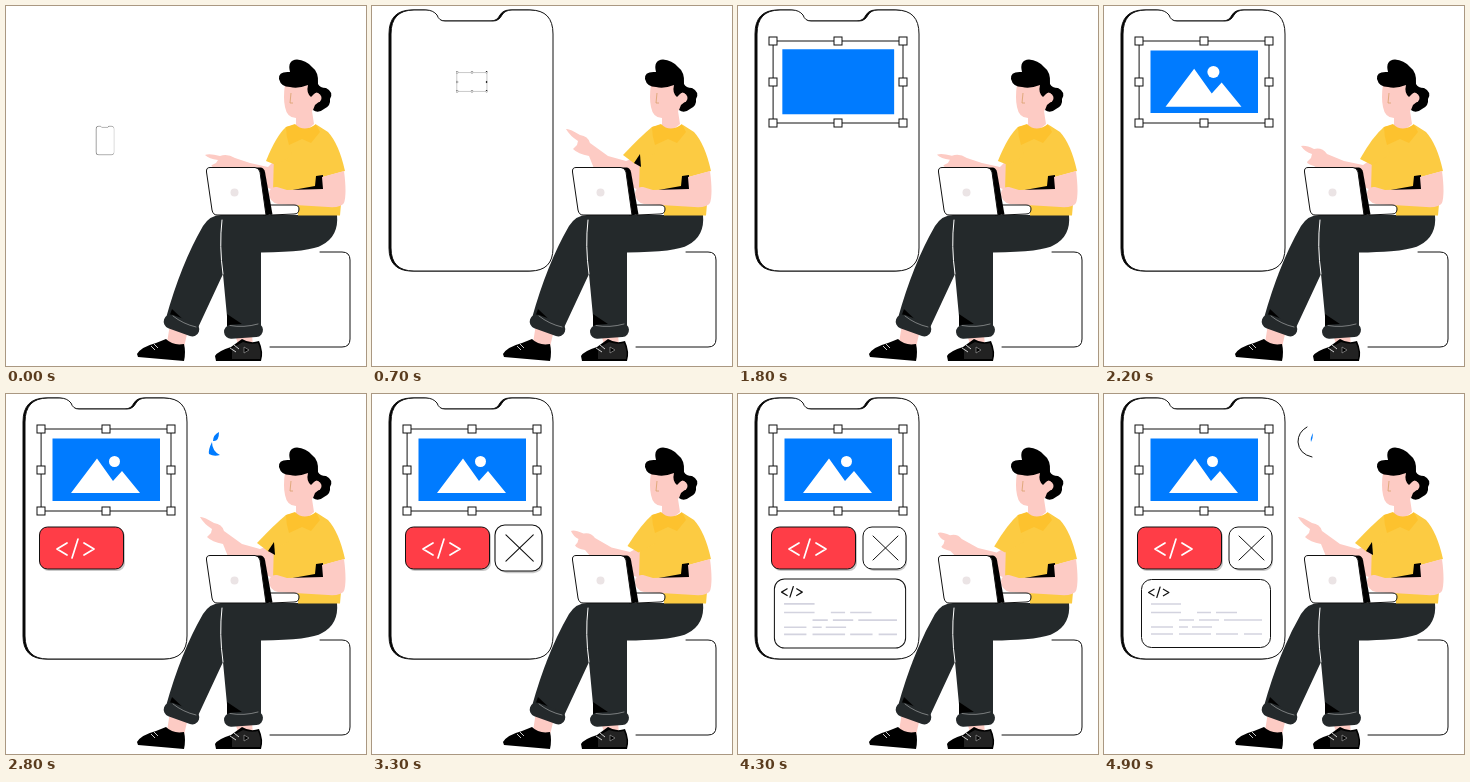
An HTML page for the animation above (5 s loop, 360 by 360 pixels).

```html
<!DOCTYPE html>
<html lang="en">
<head>
<meta charset="utf-8">
<title>App builder</title>
<style>
@property --s { syntax: "<number>"; inherits: false; initial-value: 1; }

html, body { margin: 0; width: 100%; height: 100%; overflow: hidden; background: #fff; }
svg { display: block; width: 100%; height: 100%; }

.line { fill: none; stroke: #111; stroke-width: 1; stroke-linecap: round; stroke-linejoin: round; }
.box { fill: #fff; stroke: #111; stroke-width: 1; }
.skin { fill: #fdcbc4; }
.shirt { fill: #fccb42; }
.pants { fill: #24292b; }
.blue { fill: #007bff; }

.anim, .pop { animation: 5s linear infinite; }
.pop { transform: scale(var(--s)); }
#phone { transform-origin: 99px 134.5px; animation-name: phone; }
#frame { transform-origin: 100px 76px; animation-name: frame; }
#image { transform-origin: 100.5px 75.5px; animation-name: image; }
#hills { transform-origin: 99.5px 82px; animation-name: hills; }
#code { transform-origin: 76px 154px; animation-name: code; }
#close { transform-origin: 146.5px 154px; animation-name: close; }
#card { transform-origin: 102px 219px; animation-name: card; }
#arm { animation-name: arm; animation-timing-function: ease-in-out; }
#sleeve { animation-name: sleeve; animation-timing-function: ease-in-out; }
#shade { animation-name: shade; }
#spark { animation-name: spark; }
#bubble { animation-name: bubble; }

@keyframes phone {
  0% { --s: .11; }
  8% { --s: 1.16; }
  12% { --s: 1.035; }
  14%, 100% { --s: 1; }
}
@keyframes frame {
  0%, 12% { --s: 0; }
  14% { --s: .23; }
  20% { --s: 1.14; }
  26% { --s: 1.02; }
  28%, 100% { --s: 1; }
}
@keyframes image {
  0%, 26% { --s: 0; }
  28% { --s: .34; }
  32% { --s: 1.12; }
  38%, 100% { --s: 1; }
}
@keyframes hills {
  0%, 38% { --s: 0; }
  43% { --s: 1.12; }
  44% { --s: 1.1; }
  48%, 100% { --s: 1; }
}
@keyframes code {
  0%, 46% { --s: 0; }
  51% { --s: 1.12; }
  56%, 100% { --s: 1; }
}
@keyframes close {
  0%, 58% { --s: 0; }
  64% { --s: 1.14; }
  70%, 100% { --s: 1; }
}
@keyframes card {
  0%, 73% { --s: 0; }
  76% { --s: .575; }
  80% { --s: 1.12; }
  87%, 100% { --s: 1; }
}
/* forearm: low, raised, halfway, tucked in */
@keyframes arm {
  0%, 35% { d: path("M199 149Q203 147 214 150Q221 147 229 152L244 157L262 161L268 155L268 184L225 170L209 162Q204 160 206 159L210 157L212 154Q203 153 199 149Z"); }
  14%, 56%, 98%, 100% { d: path("M194 123Q197 122 208 129Q216 130 218 137L236 150L254 155L268 150L268 184L225 170L217 150Q206 148 201 143L205 139L206 135Q198 130 194 123Z"); }
  28%, 44% { d: path("M197 140Q202 139 210 143Q218 141 223 148L240 155L259 159L268 153L268 184L225 170L210 160Q203 158 203 156L207 152L208 148Q201 146 197 140Z"); }
  76% { d: path("M204 151Q206 148 215 150Q222 146 228 151L243 157L262 161L268 155L268 184L225 170L209 162Q204 161 205 160L206 158L207 155Q204 154 204 151Z"); }
}
@keyframes sleeve {
  0%, 35%, 76% { d: path("M280 121Q270 130 260 155L270 159L286 150Z"); }
  14%, 56%, 98%, 100% { d: path("M280 121Q269 130 251 149L263 158L286 146Z"); }
  28%, 44% { d: path("M280 121Q269 130 256 153L268 159L286 149Z"); }
}
@keyframes shade {
  0%, 8%, 22%, 50%, 64%, 92% { opacity: 0; }
  14%, 56%, 98%, 100% { opacity: 1; }
}
@keyframes spark {
  0%, 55.9%, 57.9%, 100% { opacity: 0; }
  56%, 57.8% { opacity: 1; }
}
@keyframes bubble {
  0%, 97.9% { opacity: 0; }
  98%, 100% { opacity: 1; }
}
</style>
</head>
<body>
<svg viewBox="0 0 360 360">
  <defs>
    <path id="body" d="M42 4H54Q61 4 65 9Q67 15 73 15H121Q127 15 130 9Q133 4 140 4H158Q181 4 181 28V242Q181 265 158 265H42Q19 265 19 242V28Q19 4 42 4Z"/>
    <path id="tag" d="M11 4L1 10L11 16M22 0L16 19M28 4L38 10L28 16"/>
  </defs>

  <g id="phone" class="pop">
    <use href="#body" x="-2" stroke="#111"/>
    <use href="#body" class="box"/>
  </g>

  <g id="frame" class="pop">
    <rect class="line" x="35.5" y="35" width="129.5" height="82"/>
    <g id="handles" class="box"></g>
  </g>

  <rect id="image" class="blue pop" x="46.5" y="44.500" width="107.500" height="62.500"/>
  <g id="hills" class="pop" fill="#fff">
    <path d="M65 99L91 64.500L107 87L116 77L134 99Z"/>
    <circle cx="108.500" cy="67.500" r="5.500"/>
  </g>

  <g id="code" class="pop">
    <rect x="35" y="135" width="84" height="42" rx="8" fill="#c9c9c9"/>
    <rect x="33.500" y="133" width="84" height="42" rx="8" fill="#ff3d47" stroke="#111"/>
    <use href="#tag" class="line" x="50" y="145" style="stroke:#fff;stroke-width:1.7"/>
  </g>

  <g id="close" class="pop">
    <rect x="127" y="135" width="42" height="42" rx="9" fill="#c9c9c9"/>
    <rect class="box" x="125" y="133" width="43" height="42" rx="9"/>
    <path class="line" d="M135 142L160 166M160 142L135 166"/>
  </g>

  <g id="card" class="pop">
    <rect class="box" x="37.500" y="185.500" width="129" height="68" rx="10"/>
    <use href="#tag" class="line" transform="translate(44 193) scale(.55)" style="stroke-width:2.2"/>
    <path fill="none" stroke="#d3d3df" stroke-width="1.7" d="M47 210H77M47 218.500H77M93 218.500H107M112 218.500H133M75 226H90M95 226H115M120 226H158M47 233H69M75 233H84M88 233H108M47 240H69M75 240H107M112 240H134M140 240H158"/>
  </g>

  <g id="spark" class="anim blue">
    <path d="M213 38Q207 41 207 47Q213 48 213 38Z"/>
    <path d="M206 48Q202 56 203 60Q208 63 214 61Q206 57 206 48Z"/>
  </g>
  <g id="bubble" class="anim">
    <path class="line" d="M203 33Q194 38 194 48Q195 60 208 63" stroke-width=".8"/>
    <path class="blue" d="M209 39Q206 44 207 48Q209 44 209 39Z"/>
  </g>

  <!-- stool -->
  <path fill="#fff" d="M256 246H336Q344 246 344 254V333Q344 341 336 341H256Z"/>
  <path class="line" d="M314 246H336Q344 246 344 254V333Q344 341 336 341H264"/>

  <!-- feet -->
  <path class="skin" d="M164 318L182 324L178 341L161 337ZM229 328H246L247 341L233 342Z"/>
  <path d="M131 348Q135 341 150 337L160 333Q167 340 178 338Q180 346 178 355L132 351Z"/>
  <path d="M209 350Q212 345 225 341L236 333Q244 338 253 335Q258 346 255 355L210 355Z"/>
  <path fill="#222" d="M226 342L237 336Q245 339 252 337Q256 346 254 353H226Z"/>
  <path fill="none" stroke="#fff" stroke-width=".8" d="M148 338L152 342M145 340L149 344M224 342L230 346M228 339L233 343"/>
  <path stroke="#aaa" stroke-width=".6" d="M238 341L243 344L238 347Z"/>

  <!-- trousers -->
  <path class="pants" d="M215 209H331Q333 230 316 239Q305 246 255 246.500V321H222L217 268L190 326L160 312Q175 258 197 220Q204 209 215 209Z"/>
  <path d="M166 303L184 320L162 314ZM221 308L239 320H221Z"/>
  <path class="line" style="stroke:#fff" d="M216 214Q213 240 217 268"/>
  <rect class="pants" x="157" y="312.500" width="37" height="14" rx="7" transform="rotate(20 175.500 319.500)"/>
  <rect class="pants" x="218" y="318" width="39" height="14" rx="7" transform="rotate(-4 237 325)"/>
  <path class="line" style="stroke:#fff;stroke-width:.4" d="M167 310Q177 318 190 321M224 319.500Q238 322 252 318"/>

  <!-- far arm and torso -->
  <path id="arm" class="skin anim" d="M199 149Q203 147 214 150Q221 147 229 152L244 157L262 161L268 155L268 184L225 170L209 162Q204 160 206 159L210 157L212 154Q203 153 199 149Z"/>
  <path class="shirt" d="M280 121L289 119Q298 126 311 119L322 126Q333 138 339 165L317 171V183L335 198L334 209.500H292V200L267 186L268 148Z"/>
  <path id="sleeve" class="shirt anim" d="M280 121Q270 130 260 155L270 159L286 150Z"/>
  <path id="shade" class="anim" d="M262 157L268 148L269 161Z"/>

  <!-- head -->
  <path class="skin" d="M279 78Q277 92 279 101Q281 112 290 112V120Q298 128 308 118L306 105L318 90L304 74Z"/>
  <path d="M273 73Q272 65 284 66Q281 54 291 53.500Q300 54 306 61Q313 66 312 78Q314 82 320 82Q328 86 324 93Q325 100 318 103Q312 108 307 104L309 99Q315 95 314 89Q311 84 307 89L305 91Q300 87 302 79Q292 83 284 81Q275 81 273 73Z"/>
  <circle class="skin" cx="311" cy="92" r="4.500"/>
  <path fill="none" stroke="#d9a06a" stroke-width=".8" d="M285 87L284 97H287"/>
  <path fill="#fdc22e" d="M280 121L289 118Q298 127 310 118L314 126L305 137L296 133L283 139Q280 130 280 121Z"/>

  <!-- near arm -->
  <path d="M310 170L317 169V184L281 185L309 180Z"/>
  <path class="skin" d="M316 171L338 165Q341 188 338 197Q335 202 322 201L272 198Q263 196 263 187Q264 180 271 181L281 184L317 183Z"/>

  <!-- laptop -->
  <path class="box" d="M262 199H288Q293 199 293 203Q293 208 288 208L265 209Z"/>
  <path d="M249 161.500H255Q258 162 259 166L266.500 208.500L257 209.500Z"/>
  <path class="box" d="M204 161.500H249Q253 162 254 166L260 209H211Q207 209 206 204L200.500 166Q200 161.500 204 161.500Z"/>
  <circle cx="228.500" cy="186.500" r="4" fill="#ebe4e5"/>
</svg>
<script>
const handles = document.getElementById("handles");
for (const y of [35, 76, 117])
  for (const x of [35, 100, 165]) {
    if (x === 100 && y === 76) continue;
    const r = document.createElementNS(handles.namespaceURI, "rect");
    const attrs = { x: x - 4, y: y - 4, width: 8, height: 8 };
    for (const k in attrs) r.setAttribute(k, attrs[k]);
    handles.append(r);
  }

// Drive the keyframes at ten steps per second.
const anims = document.getAnimations();
anims.forEach(a => a.pause());
const start = performance.now();
function tick() {
  const t = Math.floor((performance.now() - start) / 100) * 100 % 5000;
  anims.forEach(a => { a.currentTime = t; });
  requestAnimationFrame(tick);
}
tick();
</script>
</body>
</html>
```
